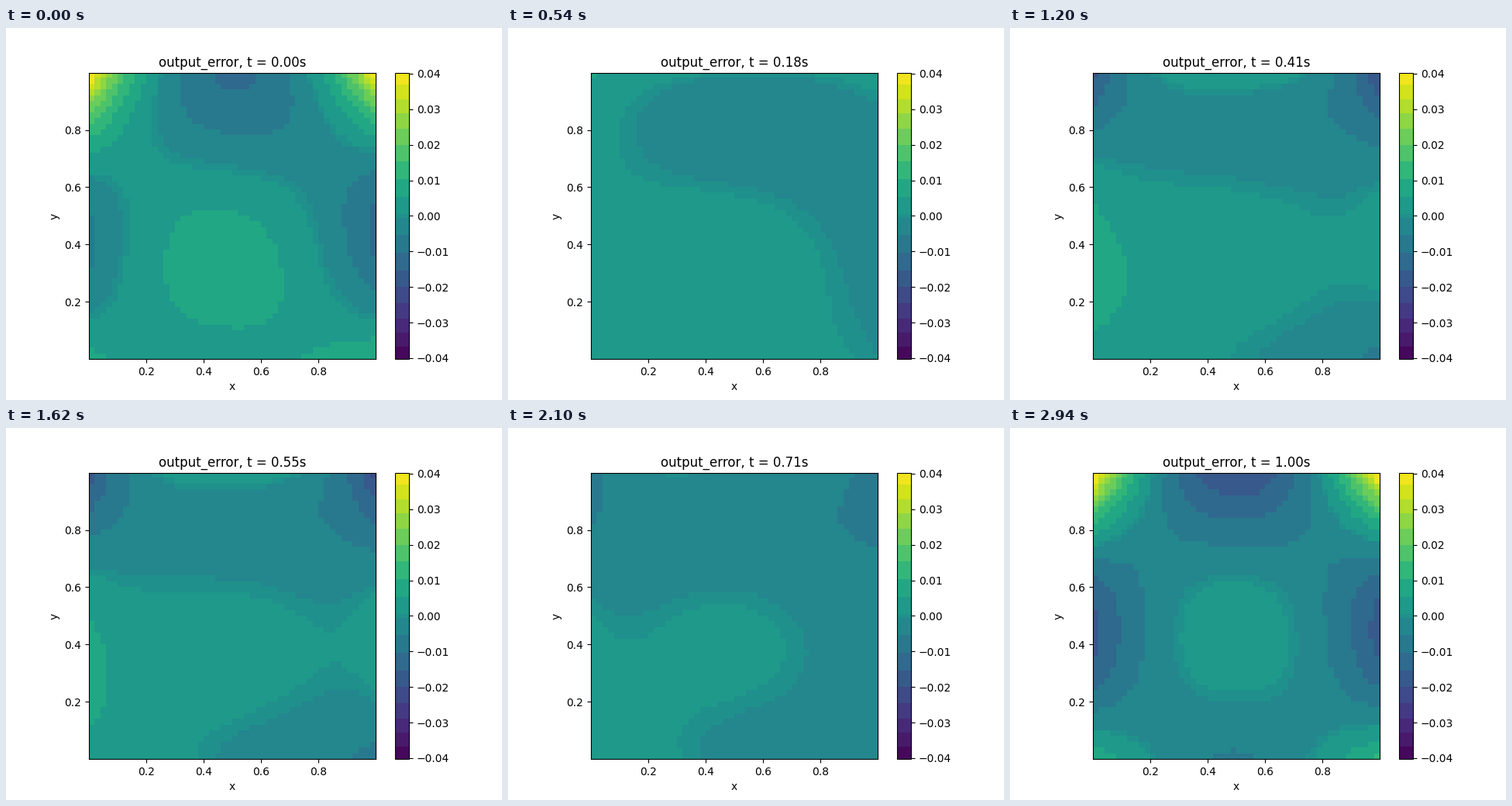
Animation of 640x480 px, one loop 3 s. Source, as a matplotlib script:

```python
import numpy as np
import matplotlib.pyplot as plt
from matplotlib.animation import FuncAnimation
from matplotlib.colors import ListedColormap

FRAMES, STEP_MS, CELLS = 50, 60, 50
VMAX = 40.27  # all values are in thousandths until drawn


def poly(s, *coeffs):
    """Polynomial in s, lowest power first."""
    return np.polynomial.polynomial.polyval(s, coeffs)


def blend(u, edge, mid, tilt, fullness):
    """Profile across x: `edge` at both sides, `mid` in the centre, plus a slope."""
    bump = (1 - u**2) * (1 + fullness * u**2)
    return edge + (mid - edge) * bump + tilt * u


def error_field(time):
    axis = np.linspace(-1, 1, CELLS)
    u, v = np.meshgrid(axis, axis)
    w = 2 * time - 1

    mean = blend(u, poly(v, -1.4, -3.3, 0, 2.7, 2.7),
                 poly(v, 2.95, -8.4, -14.1, 7.5, 9.4),
                 poly(v, -1.7, 0.95, -0.5), -1)
    trend = blend(u, poly(v, -4, 0.2, 5),
                  poly(v, -1.2, 3.1, -3.2, -2.9),
                  poly(v, 1.3, 0.4, -1.3), -0.5)
    bow = blend(u, poly(v, -10.8, 11.3, 37.1, 5.1, -2.7),
                poly(v, 1.5, -0.9, -5.9, -5.3, -2),
                poly(v, 0, -2, 2.6), 0.3)
    ripple = -7 * (1 - u**2) * (1 - 1.7 * v**2)

    return (mean + trend * w + bow * (1.5 * w**2 - 0.5)
            + ripple * w**2 * (1 - w**2))


def banded_viridis(n=1024):
    """Viridis in flat bands that narrow outwards, with a thin one at zero."""
    k = np.arange(1, 10)
    half = np.minimum(np.r_[0.5, 5.4 * k - 0.1 * k**2], VMAX)
    edges = np.r_[-half[::-1], half]
    mids = (edges[:-1] + edges[1:]) / 2
    values = VMAX * (2 * (np.arange(n) + 0.5) / n - 1)
    band = np.searchsorted(edges, values) - 1
    return ListedColormap(plt.get_cmap("viridis")((mids[band] / VMAX + 1) / 2))


times = np.arange(FRAMES) / (FRAMES - 1)
fields = [error_field(t) / 1000 for t in times]

fig, ax = plt.subplots(figsize=(6.4, 4.8), dpi=100)
im = ax.imshow(fields[0], origin="lower", extent=(0, 1, 0, 1), cmap=banded_viridis(),
               vmin=-VMAX / 1000, vmax=VMAX / 1000, interpolation="nearest")
bar = fig.colorbar(im, ax=ax)
bar.set_ticks(np.arange(-4, 5) / 100)
ticks = [0.2, 0.4, 0.6, 0.8]
ax.set(xlabel="x", ylabel="y", xticks=ticks, yticks=ticks)
title = ax.set_title("")


def update(i):
    im.set_data(fields[i])
    title.set_text(f"output_error, t = {times[i]:.2f}s")
    return im, title


anim = FuncAnimation(fig, update, frames=FRAMES, interval=STEP_MS,
                     repeat=True, repeat_delay=0, blit=False)
plt.show()
```
